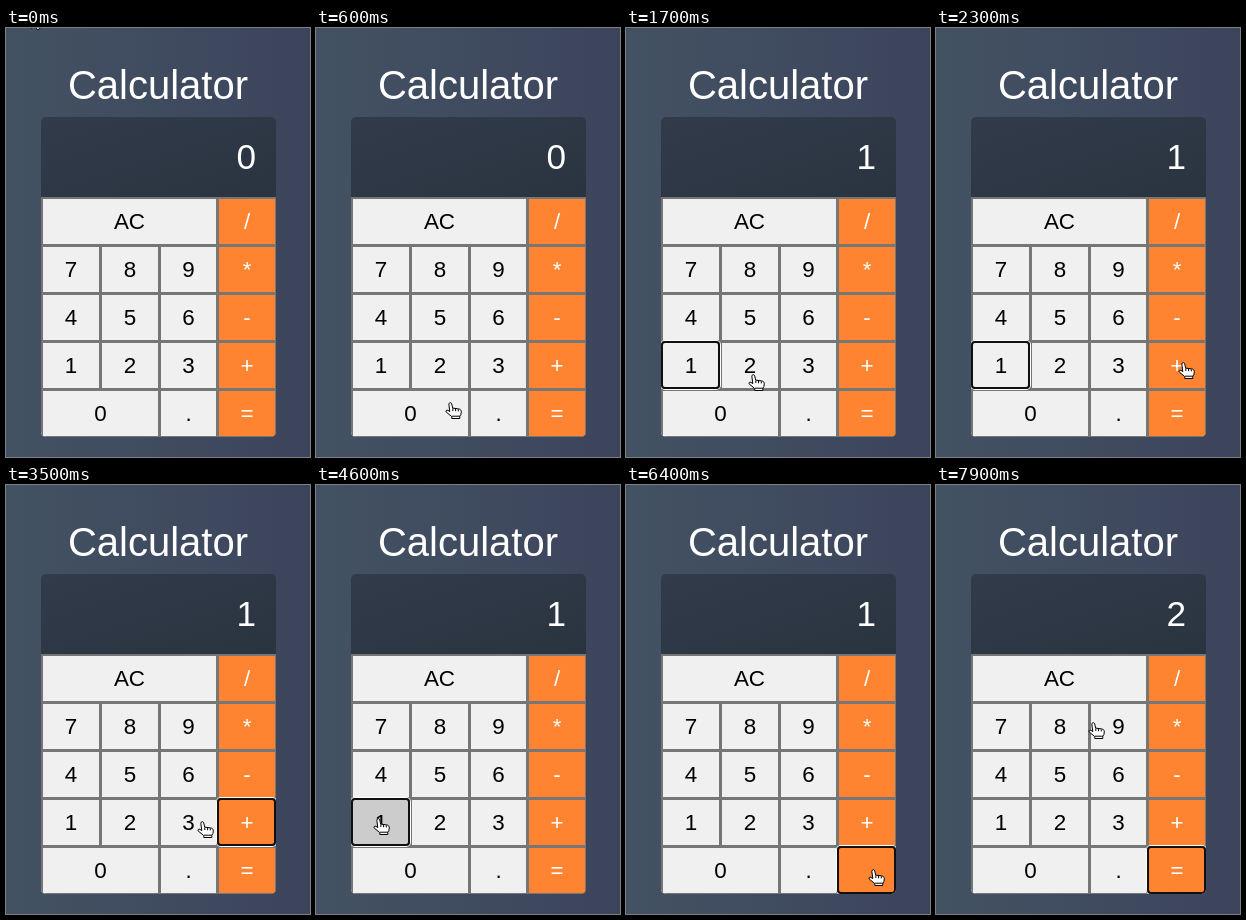
An HTML page that plays this animation: 304x429 px, repeating every 8 s.

```html
<!DOCTYPE html>
<html lang="en">
<head>
<meta charset="utf-8">
<title>Calculator</title>
<style>
  html, body { margin: 0; width: 100%; height: 100%; overflow: hidden; }
  body {
    position: relative;
    background: linear-gradient(to right, #435263, #3c445c);
    font-family: "Liberation Sans", Arial, sans-serif;
  }
  h1 {
    position: absolute; left: 0; top: 34px; width: 304px; margin: 0;
    font-size: 40px; font-weight: 400; line-height: 46px;
    text-align: center; color: #fff;
  }
  #calc {
    position: absolute; left: 35px; top: 89px; width: 235px; height: 320px;
    border-radius: 5px; overflow: hidden;
  }
  #display {
    height: 80px; padding-right: 20px;
    background: linear-gradient(to bottom right, #323b4a, #2a3440);
    color: #fff; font-size: 35.2px; line-height: 80px; text-align: right;
  }
  .key {
    position: absolute; height: 48px; box-sizing: border-box;
    border: solid #767676; border-width: 2px 1px 1px 2px;
    background: #f0f0f0; color: #000;
    font-size: 22.4px; line-height: 45px; text-align: center;
  }
  .op { background: #ff8432; color: #fff; }
  .down { background: #ccc; }
  .op.down { background: #ff8432; color: transparent; }
  #ring {
    position: absolute; width: 58.75px; height: 47.5px; box-sizing: border-box;
    border: 2px solid #101010; border-radius: 4px;
    box-shadow: 0 0 0 1px #fff;
  }
  svg { position: absolute; left: 0; top: 0; overflow: visible; }
  svg path { stroke: #000; stroke-width: 1; stroke-linejoin: round; fill: #fff; }
  svg .line { fill: none; }
</style>
</head>
<body>
<h1>Calculator</h1>
<div id="calc">
  <div id="display">0</div>
  <div id="ring"></div>
</div>
<svg id="cursor" width="18" height="18">
  <g id="hand">
    <path d="M4.2 1.2C5.2 .2 6.4 .7 6.7 1.9L7.7 6.1 13.5 6.9C15.5 7.2 16.3 8.2 16.3 9.8L15.9 12.6 14.8 14.2V16.5H6.8V14.6L1.2 10C.4 8.8 1.8 7.6 3 8.4L4.8 9.6 3.9 2.8C3.8 2.2 3.8 1.6 4.2 1.2Z"/>
    <path class="line" d="M7.8 6.4V9M10.6 6.9V9.2M13.3 7.3V9.4M7 14.2H14.8"/>
  </g>
  <path id="arrow" d="M1.5 1V16.3L5 13l2.3 4.8 2.6-1.2-2.2-4.6h4.3Z"/>
</svg>
<script>
const LOOP = 8000, STEP = 100, COL = 58.75, ROW = 48;
const $ = id => document.getElementById(id);
const calc = $('calc'), display = $('display'), ring = $('ring');
const cursor = $('cursor'), hand = $('hand'), arrow = $('arrow');

const rows = ['AC /', '7 8 9 *', '4 5 6 -', '1 2 3 +', '0 . ='];
const wide = { AC: 3, 0: 2 };
const keys = {};
rows.forEach((row, r) => {
  let col = 0;
  for (const label of row.split(' ')) {
    const span = wide[label] || 1;
    const el = document.createElement('div');
    const left = Math.round(col * COL), right = Math.round((col + span) * COL);
    el.className = col === 3 ? 'key op' : 'key';
    el.textContent = label;
    el.style.left = left + 'px';
    el.style.width = right - left + 'px';
    el.style.top = 80 + r * ROW + 'px';
    calc.insertBefore(el, ring);
    keys[label] = { el, left, top: 80 + r * ROW };
    col += span;
  }
});

// start time, number of steps, bend point, end point
const home = [24, -16];
const moves = [
  [100, 8, [245, 492], [63, 338]],
  [1500, 9, [152, 358], [242, 334]],
  [2700, 1, [238, 334], [235, 334]],
  [3400, 8, [146, 340], [58, 333]],
  [4500, 1, [57, 333], [57, 333]],
  [5100, 3, [150, 362], [242, 384]],
  [7600, 4, [260, 350], [152, 237]]
];

// press time, key, display after release
const presses = [
  [1100, '1', '1'],
  [3100, '+', '1'],
  [4600, '1', '1'],
  [6400, '=', '2']
];

const bend = (a, b, c, u) => (1 - u) ** 2 * a + 2 * u * (1 - u) * b + u * u * c;

function place(t) {
  let from = home;
  for (const [start, steps, mid, to] of moves) {
    if (t < start) break;
    const k = Math.floor((t - start) / STEP) + 1;
    if (k < steps) return [0, 1].map(i => Math.round(bend(from[i], mid[i], to[i], k / steps)));
    from = to;
  }
  return from;
}

function draw(t) {
  const [x, y] = place(t);
  cursor.style.transform = `translate(${x}px, ${y}px)`;
  const onKeys = y >= 169 && x >= 31;
  hand.style.display = onKeys ? '' : 'none';
  arrow.style.display = onKeys ? 'none' : '';

  let text = '0', focus = null, down = null;
  for (const [start, label, result] of presses) {
    if (t < start) break;
    focus = label;
    if (t < start + STEP) down = label;
    else text = result;
  }
  display.textContent = text;
  for (const label in keys) keys[label].el.classList.toggle('down', label === down);
  ring.style.display = focus ? '' : 'none';
  if (focus) {
    ring.style.left = keys[focus].left + 'px';
    ring.style.top = keys[focus].top + 'px';
  }
}

const begin = performance.now();
function tick() {
  draw((performance.now() - begin) % LOOP);
  requestAnimationFrame(tick);
}
tick();
</script>
</body>
</html>
```
